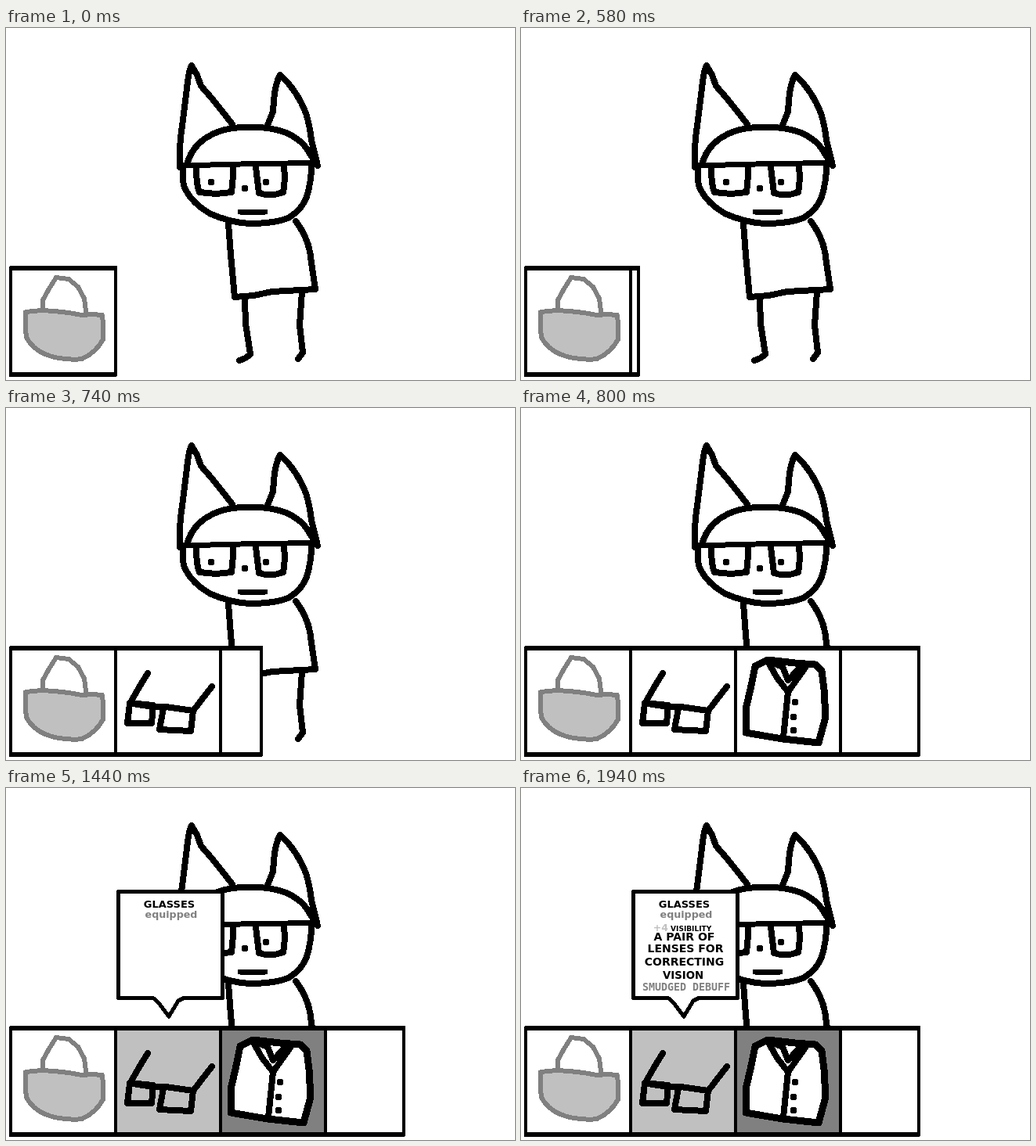
These frames come from a looping animation (650x450 px, 6940 ms). An HTML page:

```html
<!DOCTYPE html>
<html lang="en">
<head>
<meta charset="utf-8">
<style>
  html, body { margin: 0; width: 100%; height: 100%; overflow: hidden; background: #fff; }
  svg { display: block; width: 650px; height: 450px; }
  path, rect, circle { shape-rendering: crispEdges; }
  .ink { fill: none; stroke: #000; stroke-width: 8; stroke-linecap: round; stroke-linejoin: round; }
  .dots { fill: #000; stroke: none; }
  text { font: bold 14px "DejaVu Sans", sans-serif; text-anchor: middle; }
</style>
</head>
<body>
<svg viewBox="0 0 650 450">
  <g class="ink">
    <path d="M222 178Q221 150 225 125L231 77Q234 50 237 48L244 60L249 74L262 89L275 105L289 123"/>
    <path d="M334 124L341 107L342 92Q344 70 350 60Q372 80 383 109Q388 125 390 143L398 176"/>
    <path d="M232 171Q238 152 256 140Q275 128 300 127Q335 125 358 134Q380 144 388 161L397 174"/>
    <path d="M226 178C225 190 226 202 230 208Q240 226 262 238Q285 248 310 250Q345 250 362 242Q378 232 384 216Q390 195 390 178"/>
    <path style="stroke-width:7" d="M223 176L300 174L360 173L397 172"/>
    <path d="M243 180Q243 200 247 210L268 212L288 210Q290 195 290 178M319 178L323 211Q338 216 354 210Q357 195 355 178"/>
    <path style="stroke-width:7" d="M299 235H331"/>
    <path d="M284 250L287 290L292 344L316 342L340 337L395 334L390 300Q388 270 370 247"/>
    <path d="M305 347L306 378L312 417Q306 423 298 425M378 337L375 380L379 415L373 423"/>
    <g class="dots"><circle cx="262" cy="197" r="4.5"/><circle cx="332" cy="197" r="4.5"/><circle cx="305" cy="205" r="4.5"/></g>
  </g>

  <rect id="panel" x="4" y="304" height="142" rx="2"/>
  <rect id="panelInside" x="8" y="310" height="130" fill="#fff"/>
  <g class="ink" style="stroke:#808080;stroke-width:6">
    <path d="M47 361V348L54 335L64 319L80 321L92 331L100 346L102 362"/>
    <path fill="#c0c0c0" d="M25 363L45 361L62 362L80 364L97 367L110 366L123 367Q125 385 124 398Q115 415 97 423Q85 425 62 421Q35 414 26 395Q24 380 25 363Z"/>
  </g>
  <g id="glasses">
    <rect id="glassesCell" x="142" y="310" width="130" height="130"/>
    <path class="ink" d="M181 339L170 357L158 378L155 403H186L188 380L158 377Q180 382 204 382L239 387L263 356M239 387L236 413L196 411L201 384"/>
  </g>
  <g id="jacket">
    <rect id="jacketCell" x="276" y="310" width="130" height="130"/>
    <g class="ink">
      <path fill="#fff" style="stroke-width:9" d="M315 322L299 330L294 355L287 385V415L310 419L334 423L380 428L389 395L387 360L384 336L376 328L350 326Z"/>
      <path d="M314 322L327 345L341 363L335 421M341 363L363 332M318 324L334 331L341 348L360 328"/>
      <g class="dots"><circle cx="350" cy="376" r="4.5"/><circle cx="348" cy="395" r="4.5"/><circle cx="348" cy="412" r="4.5"/></g>
    </g>
  </g>
  <path id="dividers" stroke="#000" stroke-width="4"/>

  <path id="popup" fill="#fff" stroke="#000" stroke-width="5" stroke-linejoin="round"/>
  <g id="lines">
    <text x="208.5" y="153" style="font-size:13px">GLASSES</text>
    <text x="211" y="166" fill="#808080" style="font-size:12.7px">equipped</text>
    <text x="206" y="183" style="font-size:9px"><tspan fill="#c0c0c0" font-size="12.5">+4</tspan> VISIBILITY</text>
    <text x="208.5" y="195">A PAIR OF</text>
    <text x="210" y="210">LENSES FOR</text>
    <text x="208.5" y="227">CORRECTING</text>
    <text x="207" y="244" style="font-size:13.3px">VISION</text>
    <text x="211" y="259" fill="#808080" style="font:bold 13.3px 'DejaVu Sans Mono',monospace">SMUDGED DEBUFF</text>
  </g>
</svg>
<script>
const LOOP = 6940, TICK = 20;
const el = id => document.getElementById(id);
const show = (node, on) => node.style.display = on ? '' : 'none';
const lineTimes = [1340, 1440, 1540, 1640, 1740, 1840, 1940, 1940];
const lines = [...el('lines').children];
const HALF_POPUP = 'M143.5 213V132.5H276.5V213';
const FULL_POPUP = 'M143.5 132.5H276.5V268.5H227L220 272L208 292L195 275L188 268.5H143.5Z';

// Centre of the panel's right border
function panelEdge(t) {
  if (t < 500) return 140;
  const u = Math.min(1, (t - 500) / 300);
  return Math.round(144 + 364 * u ** 3.1);
}

function draw(t) {
  const edge = panelEdge(t);
  el('panel').setAttribute('width', edge - 2);
  el('panelInside').setAttribute('width', edge - 10);
  el('dividers').setAttribute('d', [140, 274, 408].filter(x => x < edge).map(x => `M${x} 307V443`).join(''));
  show(el('glasses'), edge >= 274);
  show(el('jacket'), edge >= 408);
  el('glassesCell').setAttribute('fill', t < 1300 ? '#fff' : '#c0c0c0');
  el('jacketCell').setAttribute('fill', t < 1320 ? '#fff' : '#808080');
  el('popup').setAttribute('d', t < 1300 ? '' : t < 1320 ? HALF_POPUP : FULL_POPUP);
  lines.forEach((line, i) => show(line, t >= lineTimes[i]));
}

const start = performance.now();
function tick() {
  const t = (performance.now() - start) % LOOP;
  draw(Math.floor(t / TICK) * TICK);
  requestAnimationFrame(tick);
}
tick();
</script>
</body>
</html>
```
